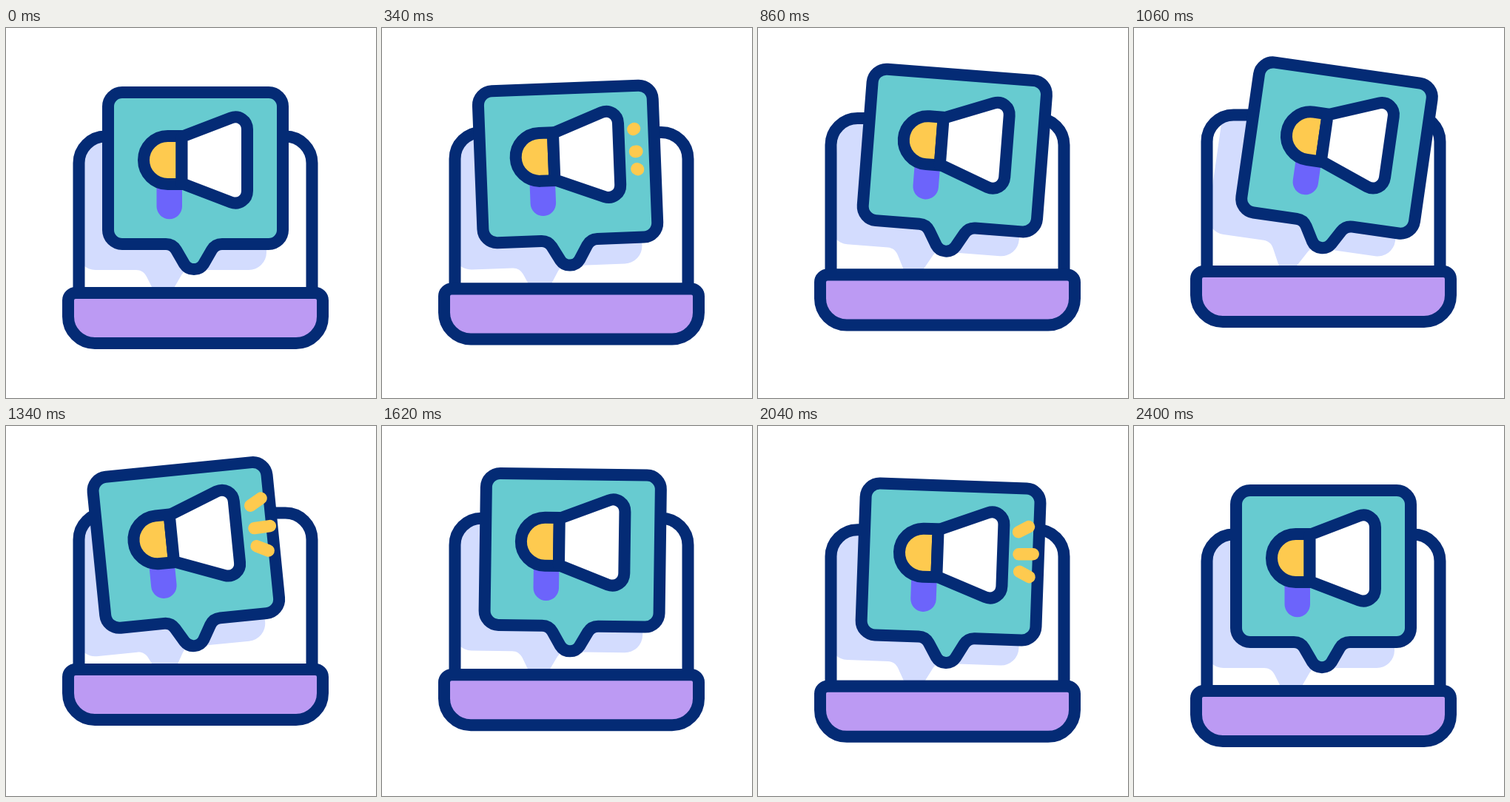
An HTML page that plays this animation: 500x500 px, repeating every 2420 ms.

```html
<!DOCTYPE html>
<html lang="en">
<head>
<meta charset="utf-8">
<title>Laptop announcement</title>
<style>
  html, body { margin: 0; width: 100%; height: 100%; overflow: hidden; background: #fff; }
  svg { display: block; width: 100vw; height: 100vh; }
  .line { stroke: #042b75; stroke-width: 16; stroke-linejoin: round; }
  .spark { stroke: #feca4f; stroke-width: 16.5; stroke-linecap: round; }
</style>
</head>
<body>
<svg viewBox="0 0 500 500" fill="none">
  <defs>
    <path id="screen" d="M98.5 358V182.500A36 36 0 0 1 134.500 146.500H377.500A36 36 0 0 1 413.500 182.500V358Z"/>
    <clipPath id="inside"><use href="#screen"/></clipPath>
  </defs>
  <g id="scene">
    <use href="#screen" fill="#fff"/>
    <g clip-path="url(#inside)">
      <path class="tilt" fill="#d3dcfe" d="M97 110H352V303A24 24 0 0 1 328 327H250C244 327 240 329 237 334L222 360H202L190 336C187 330 182 327 176 327H121A24 24 0 0 1 97 303Z"/>
    </g>
    <use href="#screen" class="line"/>
    <path class="line" fill="#bc9af3" d="M94 358H418A10 10 0 0 1 428 368V390A36 36 0 0 1 392 426H120A36 36 0 0 1 84 390V368A10 10 0 0 1 94 358Z"/>
    <g class="tilt">
      <path class="line" fill="#67cbd0" d="M157 87H355A19 19 0 0 1 374 106V273A19 19 0 0 1 355 292H292C286 292 281 295 278 300L267 319C261 328.500 247 328.500 241 319L230 300C227 295 222 292 216 292H157A19 19 0 0 1 138 273V106A19 19 0 0 1 157 87Z"/>
      <path fill="#6c64fb" d="M203.500 205H238V241A17.250 17.250 0 0 1 203.500 241Z"/>
      <path class="line" fill="#feca4f" d="M237.500 146H218.500A32.500 32.500 0 0 0 218.500 211H237.500Z"/>
      <path class="line" fill="#fff" d="M237.500 147L304 121.500C315 117.500 326 125 326 137V220C326 232 315 239.500 304 235.500L237.500 210Z"/>
      <path class="spark"/>
      <path class="spark"/>
      <path class="spark"/>
    </g>
  </g>
</svg>
<script>
  const LOOP = 2420, CYCLE = 2400;
  const SWING = { start: 200, step: 400, angles: [0, -8, 9, -6.5, 6, 0] };
  const BURST = { start: 300, period: 800, half: 200 };
  // Each spark: start x, start y, dx, dy
  const RAYS = [[346, 146, 17, -9.5], [347.5, 176, 24, -1], [349, 199.5, 17, 8.5]];

  const scene = document.getElementById('scene');
  const tilted = document.querySelectorAll('.tilt');
  const sparks = document.querySelectorAll('.spark');

  const ease = x => (1 - Math.cos(Math.PI * Math.min(1, Math.max(0, x)))) / 2;

  function swingAngle(t) {
    const { start, step, angles } = SWING;
    const pos = Math.min(angles.length - 1, Math.max(0, (t - start) / step));
    const i = Math.min(angles.length - 2, Math.floor(pos));
    return angles[i] + (angles[i + 1] - angles[i]) * ease(pos - i);
  }

  function drawSparks(t) {
    const phase = (t - BURST.start) % BURST.period;
    const visible = phase >= 0 && phase < 2 * BURST.half;
    const head = ease(phase / BURST.half);
    const tail = ease(phase / BURST.half - 1);
    sparks.forEach((spark, i) => {
      const [x, y, dx, dy] = RAYS[i];
      const point = k => `${x + dx * k} ${y + dy * k}`;
      spark.setAttribute('d', visible ? `M${point(tail)}L${point(head)}` : '');
    });
  }

  function frame(now) {
    const t = Math.min(now % LOOP, CYCLE);
    const lift = 15 * (1 - Math.cos(2 * Math.PI * t / CYCLE));
    const rotation = `rotate(${swingAngle(t)} 254 317)`;
    scene.setAttribute('transform', `translate(0 ${-lift})`);
    tilted.forEach(el => el.setAttribute('transform', rotation));
    drawSparks(t);
    requestAnimationFrame(() => frame(performance.now() - begin));
  }

  const begin = performance.now();
  frame(0);
</script>
</body>
</html>
```
